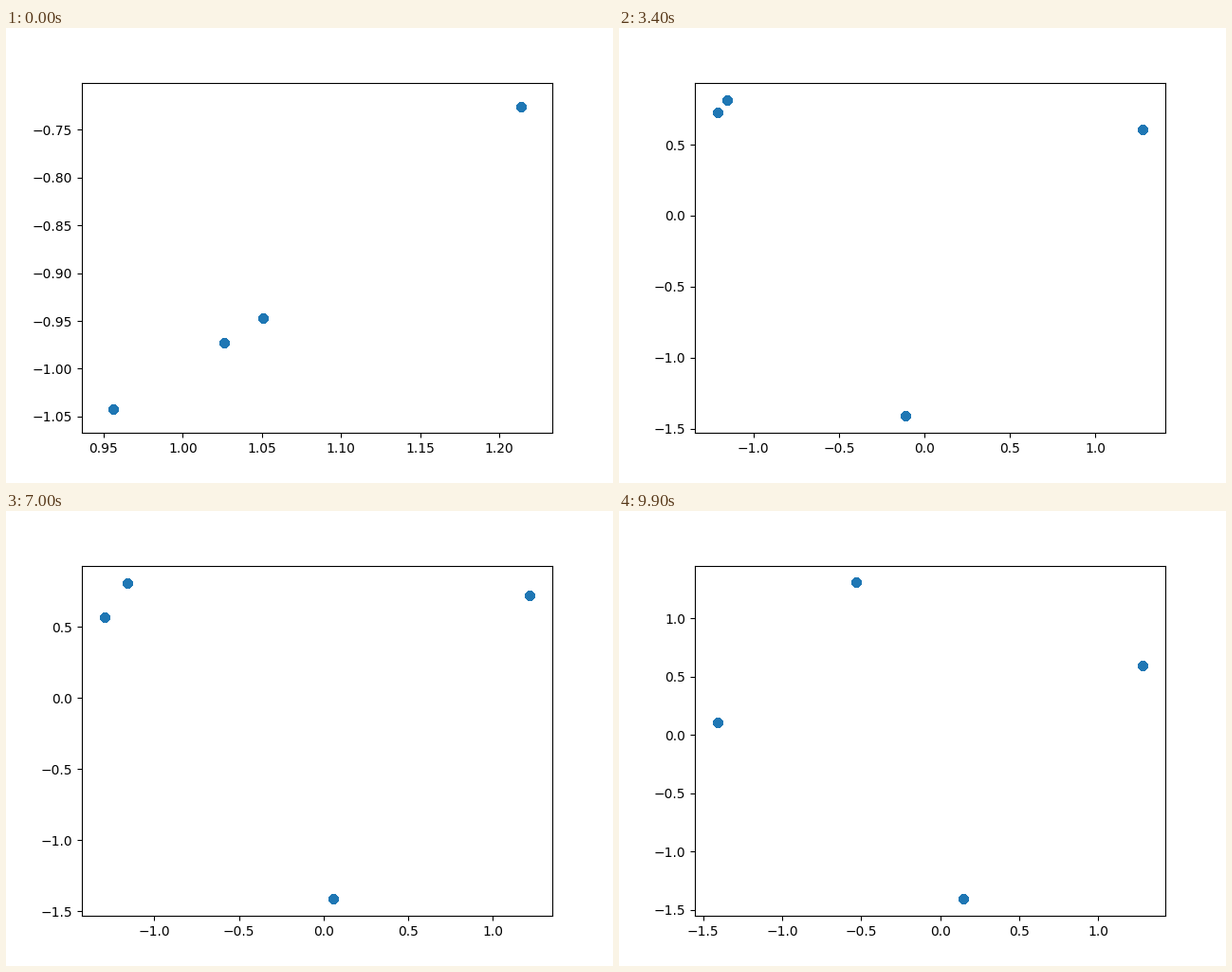
These frames come from a looping animation (640 by 480 pixels, 10000 ms). A matplotlib script:

```python
import numpy as np
import matplotlib.pyplot as plt
from matplotlib.animation import FuncAnimation

FRAMES, INTERVAL = 100, 100
RADIUS = np.sqrt(2)
COPIES = 250  # stacked markers harden the dot edges

# Four dots repel each other around a circle; angles in degrees.
POSES = {
    0: (-47.48, -43.48, -42.03, -30.87),   # bunched together
    14: (-219.66, -103.9, 1.67, 135.2),    # burst apart, outer two meet
    34: (-211.04, -94.6, 25.4, 144.74),    # drift
    61: (-204.9, -90.1, 35.3, 146.0),      # three even corners
    78: (-202.04, -85.85, 26.0, 143.04),   # pair starts to split
    99: (-184.3, -83.97, 24.87, 112.2),    # nearly a square
}
steps = np.array(list(POSES))
angles = np.array(list(POSES.values()))


def tangents():
    """Monotone cubic slopes: rest at the start, speed up at the end."""
    rate = np.diff(angles, axis=0) / np.diff(steps)[:, None]
    before, after = rate[:-1], rate[1:]
    same = before * after > 0
    total = np.where(same, before + after, 1)
    inner = np.where(same, 2 * before * after / total, 0)
    return np.vstack([0 * rate[0], inner, 2 * rate[-1]])


slopes = tangents()


def angles_at(step):
    i = min(np.searchsorted(steps, step, side="right") - 1, len(steps) - 2)
    h = steps[i + 1] - steps[i]
    u = (step - steps[i]) / h
    ease = u * u * (3 - 2 * u)
    return (angles[i] + ease * (angles[i + 1] - angles[i])
            + h * u * (1 - u) * ((1 - u) * slopes[i] - u * slopes[i + 1]))


def limits(values, pixels):
    """Data range with a marker radius and a five percent margin."""
    pad = 3 / pixels
    low, high = values.min() - pad, values.max() + pad
    margin = 0.05 * (high - low)
    return low - margin, high + margin


fig, ax = plt.subplots(figsize=(6.4, 4.8), dpi=100)
dots = ax.scatter(np.zeros(4 * COPIES), np.zeros(4 * COPIES), color="C0")


def update(step):
    theta = np.radians(angles_at(step))
    x, y = RADIUS * np.cos(theta), RADIUS * np.sin(theta)
    dots.set_offsets(np.tile(np.column_stack([x, y]), (COPIES, 1)))
    ax.set_xlim(*limits(x, 496))
    ax.set_ylim(*limits(y, 369.6))
    return (dots,)


anim = FuncAnimation(fig, update, frames=FRAMES, interval=INTERVAL,
                     init_func=lambda: update(0), repeat=True, repeat_delay=0)
plt.show()
```
